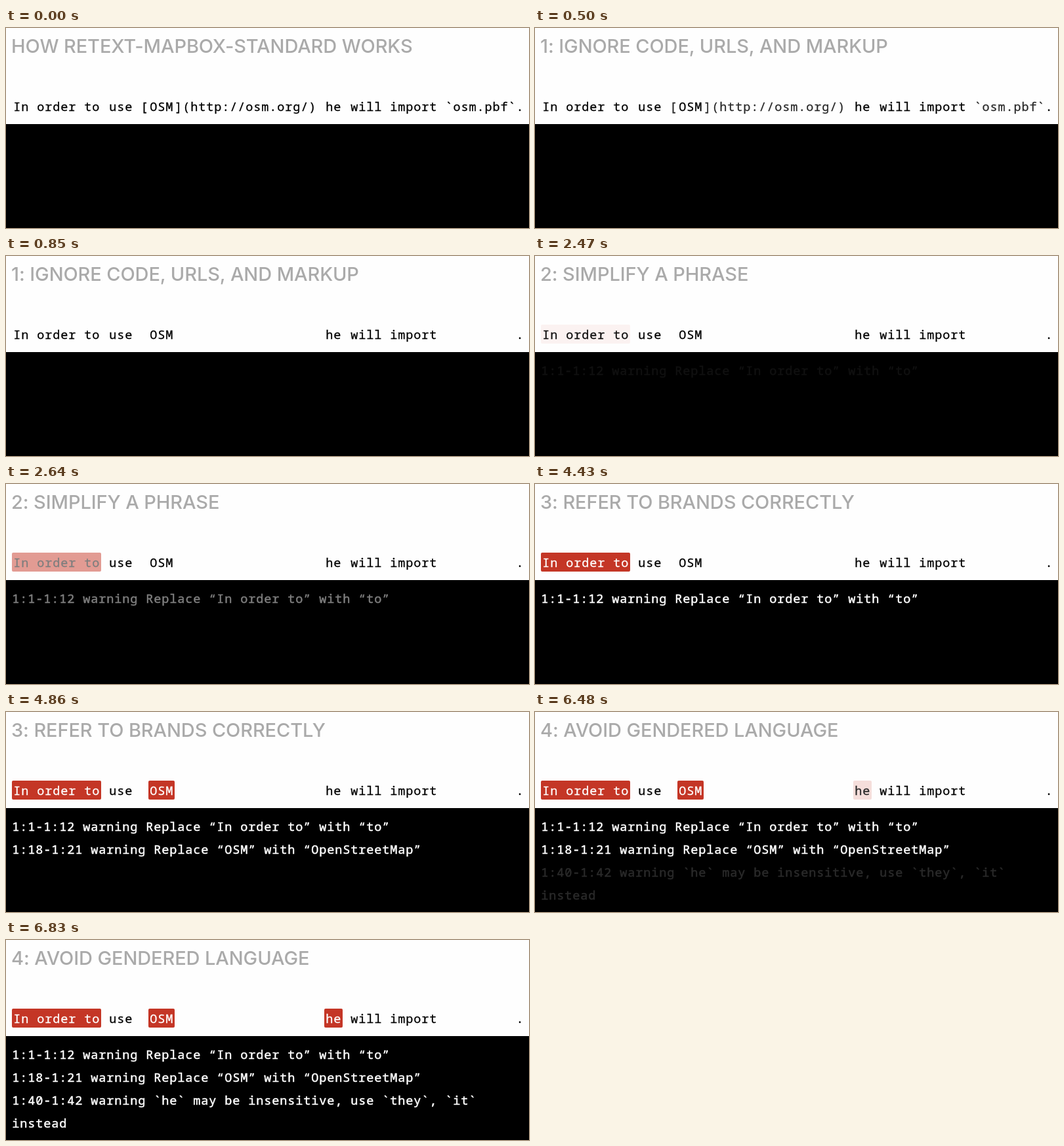
These frames come from a looping animation (797 by 306 pixels, 8000 ms). An HTML page:

```html
<!DOCTYPE html>
<html lang="en">
<head>
<meta charset="utf-8">
<style>
  html, body { margin: 0; width: 100%; height: 100%; overflow: hidden; background: #fefefe; }
  h1, p, #console { position: absolute; margin: 0; white-space: pre; }
  h1 { left: 8px; top: 0; font: 500 29px/55px Inter, sans-serif; letter-spacing: -.1px; color: #aaa; }
  p { left: 9.3px; font: 400 18.5px/29px "Noto Sans Mono", monospace; letter-spacing: calc(12px - .6em);
    -webkit-text-stroke: .3px currentColor; }
  i { font-style: normal; }
  #sentence { top: 105px; color: #000; }
  #sentence b { display: inline-block; height: 29px; font-weight: inherit; border-radius: 2px;
    margin: 0 .3px 0 -.3px; padding: 0 1.7px 0 2.3px; }
  #console { left: 0; right: 0; top: 147px; bottom: 0; background: #000; overflow: hidden; }
  #console p { line-height: 35px; color: #fff; -webkit-text-stroke-width: .5px; }
</style>
</head>
<body>
<h1></h1>
<p id="sentence"><b>In order to</b> use <i>[</i><b>OSM</b><i>](http://osm.org/)</i> <b>he</b> will import <i>`osm.pbf`</i>.</p>
<div id="console"></div>
<script>
const LOOP = 8000, STEP = 86, FADE = 400;
const titles = [
  'HOW RETEXT-MAPBOX-STANDARD WORKS',
  '1: IGNORE CODE, URLS, AND MARKUP',
  '2: SIMPLIFY A PHRASE',
  '3: REFER TO BRANDS CORRECTLY',
  '4: AVOID GENDERED LANGUAGE'
];
const warnings = [
  '1:1-1:12 warning Replace “In order to” with “to”',
  '1:18-1:21 warning Replace “OSM” with “OpenStreetMap”',
  '1:40-1:42 warning `he` may be insensitive, use `they`, `it`\ninstead'
];
// lead: how far the fade has already run when the stage first shows
const stages = [
  { start: 500, lead: 55 },
  { start: 2470, lead: 30 },
  { start: 4430, lead: 0 },
  { start: 6480, lead: 55 }
];

const title = document.querySelector('h1');
const hits = document.querySelectorAll('#sentence b');
const ignored = document.querySelectorAll('#sentence i');
const lines = warnings.map((text, i) => {
  const p = document.createElement('p');
  p.textContent = text;
  p.style.top = 10 + 35 * i + 'px';
  document.getElementById('console').append(p);
  return p;
});

// cubic-bezier(.25, .1, .25, 1)
function ease(x) {
  if (x >= 1) return 1;
  let lo = 0, hi = 1;
  const curve = (s, a, b) => 3 * a * s * (1 - s) ** 2 + 3 * b * s * s * (1 - s) + s ** 3;
  for (let i = 0; i < 20; i++) {
    const mid = (lo + hi) / 2;
    if (curve(mid, .25, .25) < x) lo = mid; else hi = mid;
  }
  return curve(lo, .1, 1);
}

function progress(t, { start, lead }) {
  if (t < start) return 0;
  const elapsed = Math.floor((t - start) / STEP) * STEP + lead;
  return elapsed > FADE - 3 ? 1 : ease(elapsed / FADE);
}

function draw(now) {
  const t = now % LOOP;
  const heading = titles[stages.filter(s => t >= s.start).length];
  if (title.textContent !== heading) title.textContent = heading;
  const [hide, ...marks] = stages.map(s => progress(t, s));
  ignored.forEach(el => el.style.opacity = 1 - hide);
  marks.forEach((k, i) => {
    const v = Math.round(255 * k);
    hits[i].style.color = `rgb(${v}, ${v}, ${v})`;
    hits[i].style.background = `rgba(196, 54, 38, ${k})`;
    lines[i].style.opacity = k;
  });
  requestAnimationFrame(draw);
}
draw(performance.now());
</script>
</body>
</html>
```
